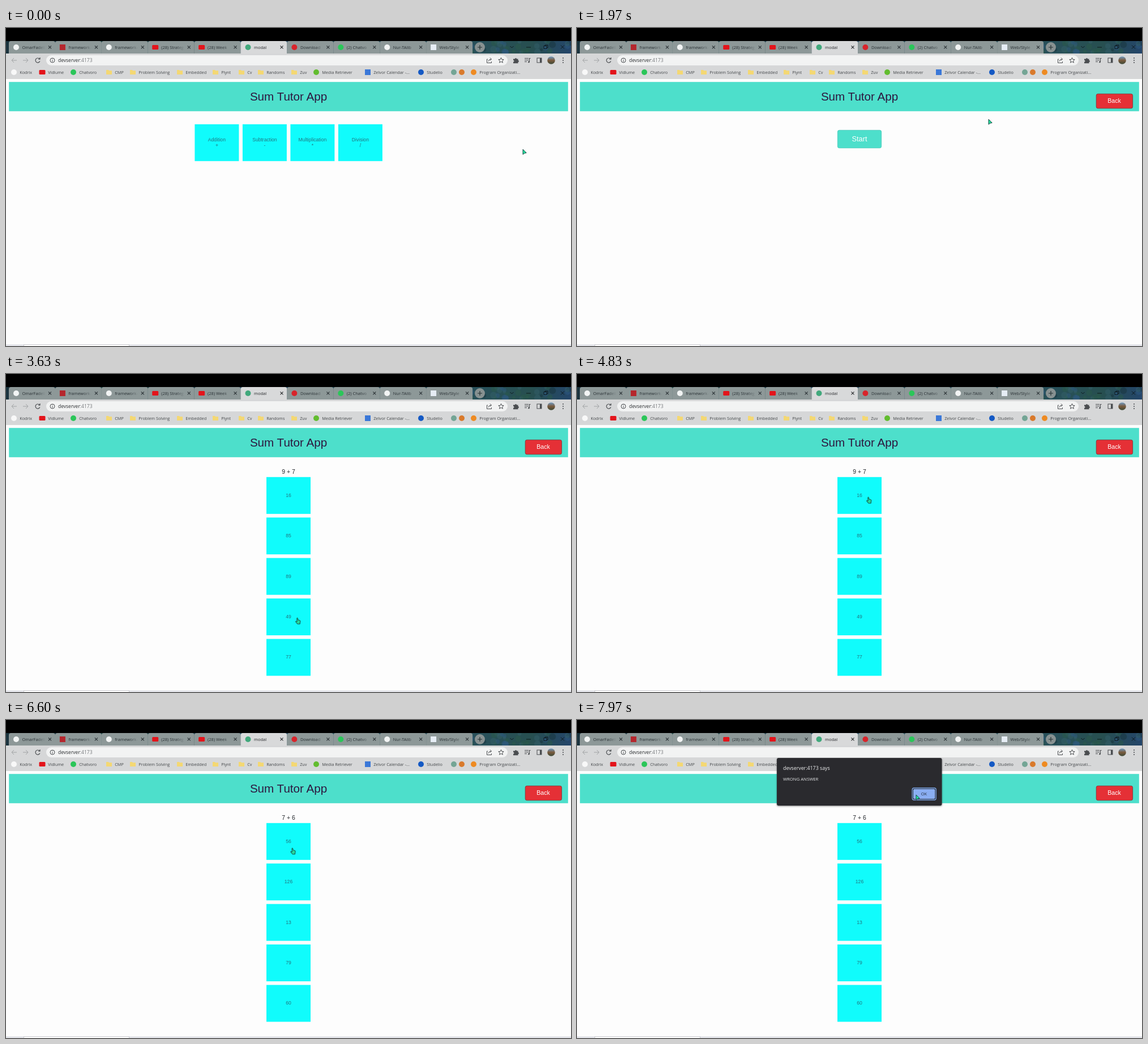
These frames come from a looping animation (998 by 561 pixels, 8000 ms). An HTML page:

```html
<!DOCTYPE html>
<html lang="en">
<head>
<meta charset="utf-8">
<title>Sum Tutor App</title>
<style>
  html, body { margin: 0; width: 100%; height: 100%; overflow: hidden; background: #fdfdfd; }
  svg { display: block; width: 100vw; height: 100vh; }
  .ui { font-family: "Open Sans", "Noto Sans", sans-serif; }
  .page { font-family: "Liberation Sans", Arial, sans-serif; }
</style>
</head>
<body>
<svg id="stage" viewBox="0 0 998 561" xmlns="http://www.w3.org/2000/svg">
  <defs>
    <linearGradient id="strip">
      <stop offset="0" stop-color="#1c343f"/><stop offset=".5" stop-color="#2b4c58"/>
      <stop offset=".84" stop-color="#28505a"/><stop offset=".93" stop-color="#274f50"/>
      <stop offset="1" stop-color="#24456a"/>
    </linearGradient>
    <linearGradient id="fade">
      <stop offset="0" stop-color="#8d9898" stop-opacity="0"/><stop offset="1" stop-color="#8d9898"/>
    </linearGradient>
    <linearGradient id="face" x2="0" y2="1">
      <stop offset="0" stop-color="#6f9cc4"/><stop offset=".5" stop-color="#7a5a3c"/>
      <stop offset="1" stop-color="#3c4a38"/>
    </linearGradient>
    <clipPath id="stripClip"><rect y="23" width="998" height="22"/></clipPath>
    <filter id="shadow" x="-10%" y="-20%" width="120%" height="150%">
      <feDropShadow dx="0" dy="1" stdDeviation="1.5" flood-opacity=".5"/>
    </filter>
  </defs>
  <g id="browser" class="ui"></g>
  <g id="page" class="page"></g>
  <g id="dialog" class="ui"></g>
  <g id="cursor" stroke="#123b38" stroke-linejoin="round">
    <path id="arrow" d="M0 0V9.2L2.3 7.2L6.2 6.2Z" fill="#25e0a0" stroke-width=".9"/>
    <path id="hand" d="M.2 .8Q1 -.6 1.9 .8L2.4 4L5.2 4.5Q6.6 4.9 6.4 6.5L5.8 9.3V11H1.2L-1.8 7.2Q-2.3 6 -1 6.1L.6 7Z" fill="#25d89c" stroke-width=".9"/>
  </g>
</svg>
<script>
const LOOP = 8000;
const HOST = 'devserver', PORT = ':4173';
const $ = id => document.getElementById(id);

const rect = (x, y, w, h, fill, extra = '') =>
  `<rect x="${x}" y="${y}" width="${w}" height="${h}" fill="${fill}" ${extra}/>`;
const dot = (x, y, r, fill, extra = '') =>
  `<circle cx="${x}" cy="${y}" r="${r}" fill="${fill}" ${extra}/>`;
const line = (d, color = '#4a4d50', width = 1) =>
  `<path d="${d}" fill="none" stroke="${color}" stroke-width="${width}"/>`;
const text = (x, y, size, fill, str, extra = '') =>
  `<text x="${x}" y="${y}" font-size="${size}" fill="${fill}" ${extra}>${str}</text>`;
const label = (x, y, size, fill, str) => text(x, y, size, fill, str, 'text-anchor="middle"');

const icon = (shape, x, y, color) => ({
  o: () => dot(x, y, 5, color),
  s: () => rect(x - 5, y - 5, 10, 10, color),
  w: () => rect(x - 5.5, y - 4, 11, 8, color, 'rx="1.5"'),
  f: () => `<path d="M${x - 5} ${y - 4}h4l1 1.2h5v6.8h-10z" fill="#f4d873"/>`
})[shape]();

const tabs = [
  ['o', '#f2f4f4', 'OmarFadell'], ['s', '#b5262d', 'framework-'], ['o', '#f2f4f4', 'framework-'],
  ['w', '#e3141b', '(28) Strateg'], ['w', '#e3141b', '(28) Week'], ['o', '#41a87c', 'modal'],
  ['o', '#d8242b', 'Download'], ['o', '#2bc659', '(2) Chatvo'], ['o', '#f2f4f4', 'Nur-TAlib'],
  ['s', '#e6edf5', 'Web/Style']
];
const bookmarks = [
  [14, 'o', '#f8f8f8', 'Kodrix'], [64, 'w', '#e3141b', 'Vidlume'], [119, 'o', '#2bc659', 'Chatvoro'],
  [182, 'f', '', 'CMP'], [224, 'f', '', 'Problem Solving'], [307, 'f', '', 'Embedded'],
  [370, 'f', '', 'Plynt'], [416, 'f', '', 'Cv'], [450, 'f', '', 'Randoms'], [509, 'f', '', 'Zuv'],
  [548, 'o', '#62bd2f', 'Media Retriever'], [639, 's', '#3b78d8', 'Zelvor Calendar -...'],
  [733, 'o', '#1459c4', 'Studelio'], [791, 'o', '#74a595', ''], [805, 'o', '#d97a2c', ''],
  [826, 'o', '#ee8b22', 'Program Organizati...']
];

// Blurry foliage of the window theme, from a seeded generator
function drawTheme() {
  let seed = 7;
  const rnd = () => (seed = seed * 16807 % 2147483647) / 2147483647;
  const colors = ['#16313a', '#35616b', '#2b5a4a', '#2f5a86'];
  const blots = Array.from({ length: 150 }, () =>
    dot(rnd() * 998, 23 + rnd() * 22, 2 + rnd() * 4, colors[Math.floor(rnd() * 4)], 'opacity=".45"'));
  return rect(0, 23, 998, 23, 'url(#strip)') + `<g clip-path="url(#stripClip)">${blots.join('')}</g>`;
}

function drawTab([shape, color, name], i) {
  const x = 5 + i * 81.9, active = i === 5;
  const bg = active ? '#d8d9da' : '#8d9898';
  const ink = active ? '#26282a' : '#2b3236';
  const cx = x + 72.5;
  return `<path d="M${x} 45V27q0-4 4-4h74q4 0 4 4v18z" fill="${bg}"/>` +
    icon(shape, x + 13, 34, color) +
    text(x + 23.5, 36.6, 7.5, ink, name) +
    (active ? '' : rect(x + 50, 26, 15, 16, 'url(#fade)') + rect(x + 65, 26, 15, 16, bg)) +
    line(`M${cx - 2.5} 31.3l5 5m0-5l-5 5`, ink, 1.1);
}

function drawBrowser() {
  const ink = '#4a4d50';
  const tools =
    line('M19 57h-9m4-4l-4 4l4 4', '#a0a2a4') + line('M30 57h9m-4-4l4 4l-4 4', '#a0a2a4') +
    line('M59.2 54.5a4 4 0 1 0 .6 4M60 52v3h-3', ink, 1.2) +
    dot(82, 57, 4, 'none', `stroke="${ink}"`) + line('M82 56.5v3M82 54.4v1', ink) +
    line('M851 55h-1.5v6.5h8v-2.5M852 59q.5-4 5-4M855 52.5l2.5 2.5l-2.5 2.5', ink) +
    `<path d="M874.5 52.3l1.3 3.1l3.4.3l-2.6 2.2l.8 3.3l-2.9-1.8l-2.9 1.8l.8-3.3l-2.6-2.2l3.4-.3z" fill="none" stroke="${ink}"/>` +
    `<path d="M896 54.5h3a1.5 1.5 0 0 1 3 0h2.5v2.5a1.5 1.5 0 0 1 0 3v2.2h-8.5v-2.5a1.5 1.5 0 0 0 0-3z" fill="${ink}"/>` +
    line('M916 53.5h7M916 56.5h7M916 59.5h4M924.5 60v-6.5h2', ink, 1.1) + dot(923.5, 60, 1.4, ink) +
    rect(938, 53, 8, 8, 'none', `stroke="${ink}"`) + rect(943, 53, 3, 8, ink) +
    dot(963, 57, 6.8, 'url(#face)') +
    [53, 57, 61].map(y => dot(984, y, 1, ink)).join('');
  const controls =
    line('M890.5 32l3 3l3-3M919 34h8M950 31.5h5v5h-5zM952 31.5v-1.5h5v5h-2M980 30.5l6 6m0-6l-6 6', '#0d191d');
  const marks = bookmarks.map(([x, shape, color, name]) =>
    icon(shape, x, 78, color) + text(x + 10.2, 80.5, 7.3, '#45484b', name)).join('');

  $('browser').innerHTML =
    rect(0, 0, 998, 561, '#fdfdfd') + rect(0, 0, 998, 23, '#000') + drawTheme() +
    tabs.map(drawTab).join('') +
    dot(837, 34, 9, '#879191') + line('M833 34h8M837 30v8', '#243033', 1.2) + controls +
    rect(0, 45, 998, 45, '#d6d7d8') + rect(71, 48, 815, 18, '#f2f3f3', 'rx="9"') + tools +
    text(92, 60, 8.5, '#2a2d30', `${HOST}<tspan fill="#777a7d">${PORT}</tspan>`) + marks +
    rect(0, 558, 998, 3, '#e5e6eb') + rect(31.5, 558.5, 186, 4, '#fff', 'stroke="#c9cacf"');
}

const CARD = { w: 78, h: 65 };
const CARD_INK = '#22747f';
const card = (x, y, name, sign) =>
  rect(x, y, CARD.w, CARD.h, '#10fcfc') +
  label(x + 39, y + (sign ? 30 : 35), 8.6, CARD_INK, name) +
  (sign ? label(x + 39, y + 40, 8.6, CARD_INK, sign) : '');

const menu = [['Addition', '+'], ['Subtraction', '-'], ['Multiplication', '*'], ['Division', '/']];
const menuX = i => 333.4 + i * 84.5;
const answerY = i => 181.8 + i * 71.4;
const quiz = (question, ...answers) =>
  label(499, 176, 10.4, '#24282c', question) +
  answers.map((a, i) => card(460, answerY(i), a)).join('');

const header = rect(5.2, 95.2, 987.6, 51.6, '#4ddfcb') +
  label(499, 128.4, 20.6, '#2d173f', 'Sum Tutor App');
const back = rect(917.2, 116.2, 64.4, 25.6, '#e53036', 'rx="3" stroke="#7c2529" stroke-width=".7"') +
  label(949, 132.4, 10.6, '#fff', 'Back');

const answerSpots = [0, 1, 2, 3, 4].map(i => [460, answerY(i)]);
const scenes = [
  { from: 0, art: menu.map(([n, s], i) => card(menuX(i), 169.8, n, s)).join(''),
    spots: menu.map((_, i) => [menuX(i), 169.8]) },
  { from: 1150, art: back + rect(460.3, 180.3, 77.4, 31.4, '#4ddfcb', 'rx="3" stroke="#3fc4b3" stroke-width=".7"') +
      label(499, 200.3, 12.8, '#fff', 'Start'),
    spots: [[460, 180, 78, 32], [917, 116, 65, 26]] },
  { from: 2650, art: back + quiz('9 + 7', 16, 85, 89, 49, 77), spots: answerSpots },
  { from: 4950, art: back + quiz('6 + 2', 15, 0, 8, 8, 6), spots: answerSpots },
  { from: 5850, art: back + quiz('7 + 6', 56, 126, 13, 79, 60), spots: answerSpots }
];

function drawDialog() {
  $('dialog').innerHTML =
    rect(353, 67, 291.5, 84, '#292b2e', 'rx="3" filter="url(#shadow)"') +
    text(364, 88, 8.8, '#f0f1f2', `${HOST}${PORT} says`) +
    text(364, 106.5, 7.7, '#e4e6e8', 'WRONG ANSWER') +
    rect(592.2, 120, 42, 21, '#292b2e', 'rx="3" stroke="#7ea6e8" stroke-width="1.3"') +
    rect(594, 121.8, 38.4, 17.4, '#8aaef2', 'rx="2"') +
    label(613, 133.2, 7.5, '#25303f', 'OK');
}

// time, x, y of the pointer tip
const path = [
  [0, 913, 214], [150, 913, 214], [1000, 374, 206], [1200, 374, 206],
  [1900, 727, 161], [2020, 727, 161], [2520, 506, 198], [2720, 506, 198],
  [3400, 513.5, 430], [3750, 513.5, 430], [4500, 513.5, 217], [5000, 513.5, 217],
  [5600, 499.5, 435.5], [5900, 499.5, 435.5], [6700, 505, 216.5], [7220, 505, 216.5],
  [7850, 599, 132], [LOOP, 599, 132]
];
const clamp = v => Math.max(0, Math.min(1, v));
const ease = p => p * p * (3 - 2 * p);

function pointerAt(t) {
  const i = path.findIndex(k => k[0] > t);
  const [t0, x0, y0] = path[i - 1], [t1, x1, y1] = path[i];
  const p = ease((t - t0) / (t1 - t0));
  return [x0 + (x1 - x0) * p, y0 + (y1 - y0) * p];
}

let shown = null;
function render(t) {
  const scene = scenes.filter(s => s.from <= t).pop();
  if (scene !== shown) {
    $('page').innerHTML = header + scene.art;
    shown = scene;
  }
  const open = clamp((t - 7110) / 120);
  $('dialog').setAttribute('opacity', open);
  $('dialog').setAttribute('transform', `translate(0 ${-16 * (1 - open)})`);

  const [x, y] = pointerAt(t);
  const over = t < 7220 && scene.spots.some(([sx, sy, w = CARD.w, h = CARD.h]) =>
    x >= sx && x <= sx + w && y >= sy && y <= sy + h);
  $('cursor').setAttribute('transform', `translate(${x} ${y})`);
  $('hand').setAttribute('visibility', over ? 'visible' : 'hidden');
  $('arrow').setAttribute('visibility', over ? 'hidden' : 'visible');
}

drawBrowser();
drawDialog();
const start = performance.now();
function tick() {
  render((performance.now() - start) % LOOP);
  requestAnimationFrame(tick);
}
tick();
</script>
</body>
</html>
```
